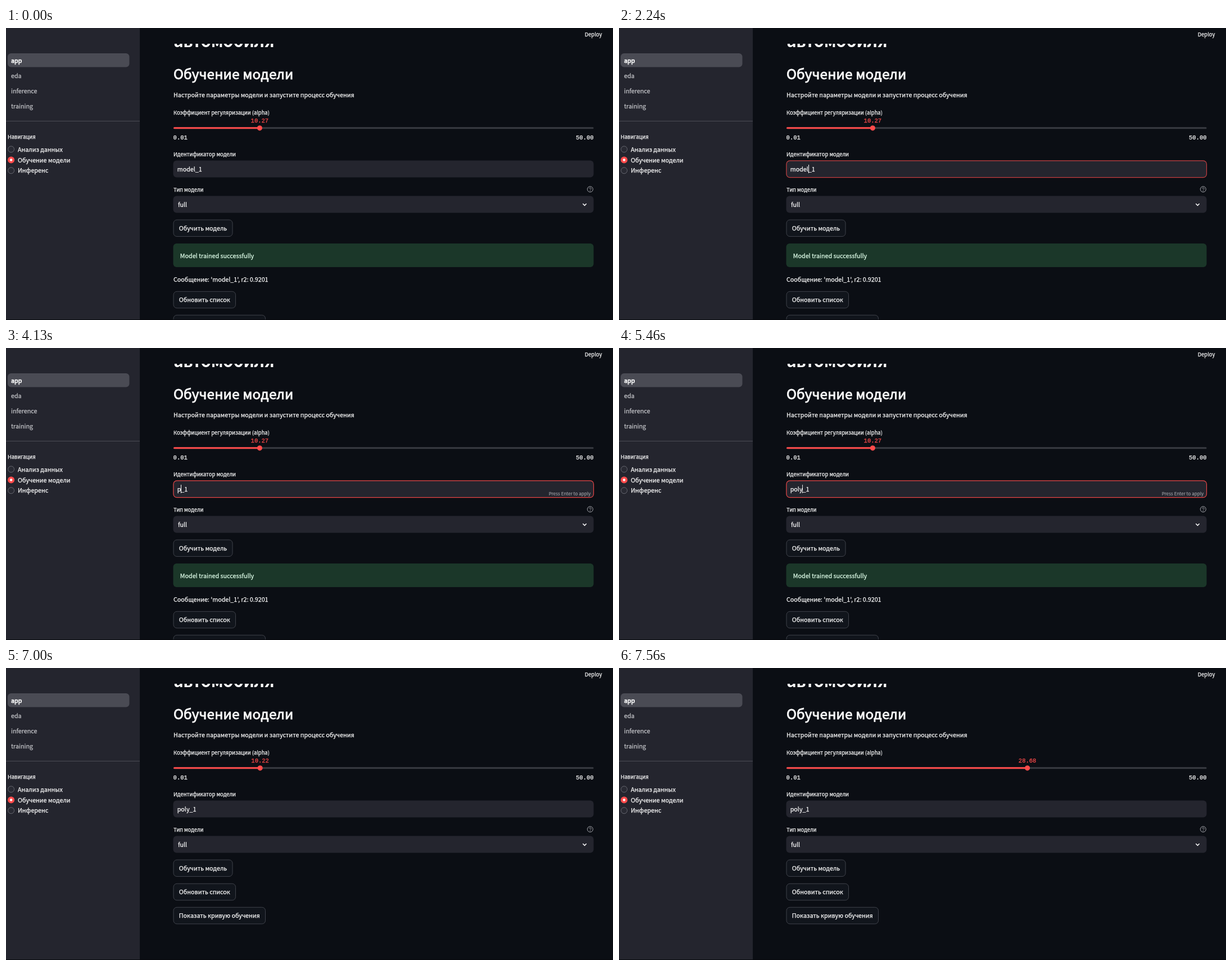
An HTML page for the animation above (8 s loop, 1080 by 519 pixels).

```html
<!DOCTYPE html>
<html lang="ru">
<head>
<meta charset="utf-8">
<title>Обучение модели</title>
<style>
  html, body { margin: 0; width: 100%; height: 100%; overflow: hidden; background: #0b0e14; }
  svg { display: block; width: 1080px; height: 519px; }
  text {
    font: 10.74px "Noto Sans CJK JP", "Noto Sans CJK SC", "Noto Sans CJK", "Open Sans", sans-serif;
    color: #fafafa; fill: currentColor; stroke: currentColor; stroke-width: .25px;
    white-space: pre;
  }
  .small { font-size: 9.4px; }
  .hint { font-size: 8.06px; color: #a6a7ac; stroke-width: .1px; text-anchor: end; }
  .h1 { font-size: 29.5px; font-weight: 700; letter-spacing: -.4px; stroke: none; }
  .h2 { font-size: 24.17px; stroke-width: .9px; letter-spacing: .2px; }
  .nav { color: #c3c4c8; }
  .current { color: #fff; stroke-width: .6px; }
  .mono { font: 10.5px "Liberation Mono", "DejaVu Sans Mono", monospace; stroke-width: .25px; }
  .value { color: #ff4b4b; text-anchor: middle; }
  .end { text-anchor: end; }
  .ok { color: #dffde9; }
  .panel { fill: #24252e; }
  .red { fill: #ff4b4b; }
  .button rect { fill: #11151c; stroke: #3f424a; }
  .radio { fill: #292a33; stroke: #66676f; }
  .icon { fill: none; stroke: #a9aab0; }
</style>
</head>
<body>
<svg viewBox="0 0 1080 519">
  <defs>
    <clipPath id="page"><rect x="238" y="28" width="842" height="491"/></clipPath>
  </defs>
  <rect width="1080" height="519" fill="#0b0e14"/>

  <!-- sidebar -->
  <rect class="panel" width="238" height="518"/>
  <rect x="3" y="45" width="216.5" height="24.5" rx="6" fill="#4a4b54"/>
  <text class="current" x="9" y="61.7">app</text>
  <text class="nav" x="9" y="88.7">eda</text>
  <text class="nav" x="9" y="115.7">inference</text>
  <text class="nav" x="9" y="142.7">training</text>
  <rect y="165" width="238" height="1" fill="#4b4c55"/>
  <text class="small" x="3" y="197.3">Навигация</text>
  <circle class="radio" cx="9.1" cy="215.5" r="5.5"/>
  <circle class="red" cx="9.1" cy="234.5" r="6"/>
  <circle cx="9.1" cy="234.5" r="2.2" fill="#fff"/>
  <circle class="radio" cx="9.1" cy="253.3" r="5.5"/>
  <text x="21" y="219.7">Анализ данных</text>
  <text x="21" y="238.5">Обучение модели</text>
  <text x="21" y="257.3">Инференс</text>

  <!-- page -->
  <text class="small" x="1029.7" y="14.5">Deploy</text>
  <g clip-path="url(#page)">
    <text class="h1" x="298.2" y="34">автомобиля</text>
    <text class="h2" x="298" y="91">Обучение модели</text>
    <text x="298" y="123.4">Настройте параметры модели и запустите процесс обучения</text>

    <text class="small" x="298" y="153.7">Коэффициент регуляризации (alpha)</text>
    <text id="value" class="mono value" y="168.3"></text>
    <rect x="298" y="176.3" width="747.5" height="3" rx="1.5" fill="#393b42"/>
    <rect id="fill" class="red" x="298" y="176.3" height="3" rx="1.5"/>
    <circle id="thumb" class="red" cy="177.8" r="4.6"/>
    <text class="mono" x="297.6" y="198.2">0.01</text>
    <text class="mono end" x="1045.5" y="198.2">50.00</text>

    <text class="small" x="298" y="227.6">Идентификатор модели</text>
    <rect class="panel" x="297.5" y="235.5" width="748" height="30" rx="6"/>
    <rect id="border" x="297.9" y="235.9" width="747.6" height="29.7" rx="6" fill="none" stroke="#ff4b4b" stroke-width="1.2"/>
    <rect id="selection" y="243" height="15" fill="#3f638b"/>
    <text id="entry" x="304.7" y="255"></text>
    <rect id="caret" y="243" width="1" height="15" fill="#fff"/>
    <text id="hint" class="hint" x="1040.2" y="261.6">Press Enter to apply</text>

    <text class="small" x="298" y="290.6">Тип модели</text>
    <circle class="icon" cx="1039.3" cy="286.6" r="5"/>
    <path class="icon" d="M1037.6 285.6a1.7 1.7 0 1 1 2.6 1.4q-.9.5-.9 1.3M1039.3 289v1"/>
    <rect class="panel" x="297.5" y="298.5" width="748" height="30" rx="6"/>
    <text x="306" y="318">full</text>
    <path d="M1026.3 312.2l3.2 3.2l3.2-3.2" fill="none" stroke="#fafafa" stroke-width="1.5"/>

    <g class="button">
      <rect x="298" y="341" width="105" height="29.5" rx="6"/>
      <text x="307.8" y="360.1">Обучить модель</text>
    </g>
    <g id="result">
      <rect x="297.5" y="383" width="748" height="42" rx="6" fill="#1b3729"/>
      <text class="ok" x="309.8" y="408.5">Model trained successfully</text>
      <text x="298" y="450.7">Сообщение: 'model_1', r2: 0.9201</text>
    </g>
    <g id="actions">
      <g class="button">
        <rect x="298" y="383.3" width="110.5" height="29.5" rx="6"/>
        <text x="307.8" y="402.3">Обновить список</text>
      </g>
      <g class="button">
        <rect x="298" y="425.3" width="163.5" height="29.5" rx="6"/>
        <text x="307.8" y="444.3">Показать кривую обучения</text>
      </g>
    </g>
  </g>
  <rect y="518" width="1080" height="1" fill="#07090d"/>
</svg>
<script>
  const LOOP = 8000, STEP = 70;
  const MIN = 0.01, MAX = 50, LEFT = 298, WIDTH = 747.3, TEXT_X = 305;
  const el = id => document.getElementById(id);
  const set = (id, attrs) => {
    for (const name in attrs) el(id).setAttribute(name, attrs[name]);
  };
  const show = (id, on) => set(id, { opacity: +on });
  const clamp = v => Math.min(1, Math.max(0, v));
  const smooth = v => v * v * (3 - 2 * v);

  // Last entry of [time, value] pairs already reached
  const at = (track, t) => track.filter(([start]) => start <= t).pop()[1];

  const typed = [[0, 'model'], [4130, 'p'], [4270, 'po'], [4480, 'pol'], [4900, 'poly']];
  const focus = [[0, 0], [2240, .75], [2310, .9], [6930, .4], [7000, 0]];
  // Number of letters left of the dragged selection
  const selectFrom = [[0, 5], [2310, 4], [2380, 3], [2450, 1], [2520, 0], [4130, 5]];

  function caretAlpha(t) {
    if (t < 2240 || (t >= 2310 && t < 4130) || t >= 6930) return 0;
    const fade = start => clamp((t - start + 20) / 160);
    return 1 - fade(5460) + fade(5880) - fade(6580);
  }

  function drawEntry(t) {
    const word = at(typed, t), entry = el('entry');
    if (entry.textContent !== word + '_1') entry.textContent = word + '_1';
    const edge = n => TEXT_X + (n ? entry.getSubStringLength(0, n) : 0);
    const end = edge(word.length);
    const from = word === 'model' ? edge(at(selectFrom, t)) : end;
    set('selection', { x: from, width: Math.max(0, end - from) });
    set('caret', { x: Math.floor(end), opacity: caretAlpha(t) });
    set('border', { opacity: at(focus, t) });
    show('hint', t >= 4130 && t < 6930);
  }

  function drawSlider(t) {
    const toX = v => LEFT + (v - MIN) / (MAX - MIN) * WIDTH;
    const start = t < 6930 ? 10.27 : 10.22;
    const value = start + (28.68 - start) * smooth(clamp((t - 6975) / 585));
    const x = toX(value);
    set('fill', { width: x - LEFT });
    set('thumb', { cx: x });
    set('value', { x });
    el('value').textContent = (t < 7070 ? start : value).toFixed(2);
  }

  function draw(now) {
    const t = Math.floor(now % LOOP / STEP) * STEP;
    const trained = t < 7000;
    drawEntry(t);
    drawSlider(t);
    show('result', trained);
    set('actions', { transform: `translate(0 ${trained ? 85 : 0})` });
  }

  const begin = performance.now();
  function tick() {
    draw(performance.now() - begin);
    requestAnimationFrame(tick);
  }
  tick();
</script>
</body>
</html>
```
